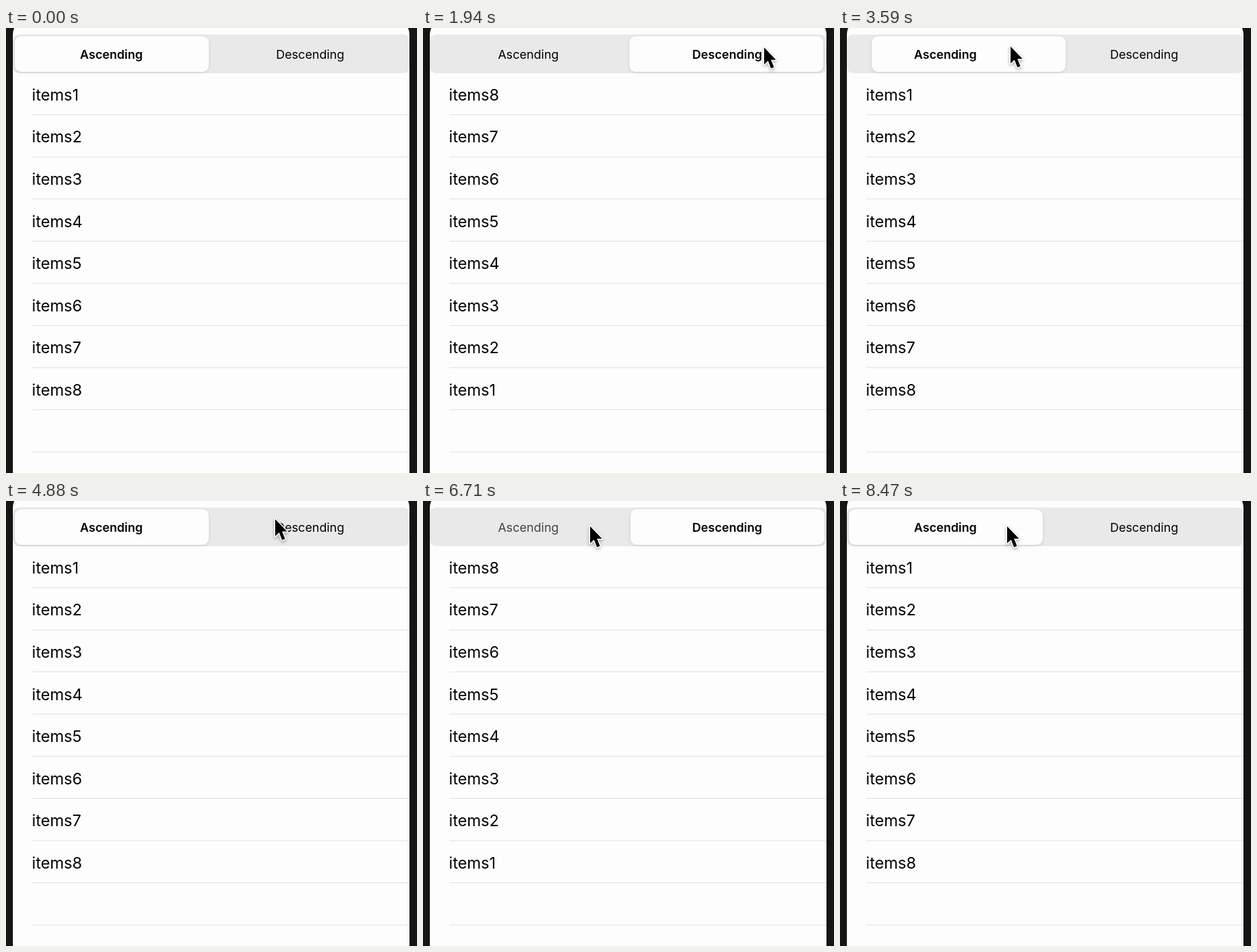
An HTML page for the animation above (8.59 s loop, 600 by 650 pixels).

```html
<!DOCTYPE html>
<html lang="en">
<head>
<meta charset="utf-8">
<title>Sortable list</title>
<style>
  html, body { margin: 0; width: 100%; height: 100%; overflow: hidden; background: #151515; }
  svg { display: block; width: 600px; height: 650px; }
  text { font-family: Inter, "Liberation Sans", sans-serif; fill: #000; }
  .seg { font-size: 17.7px; text-anchor: middle; }
  .bold { font-weight: 600; }
  .row { font-size: 23.2px; }
  #thumb { filter: drop-shadow(0 1px 2px rgba(0, 0, 0, .12)); }
  #cursor { filter: drop-shadow(0 2px 2px rgba(0, 0, 0, .3)); }
</style>
</head>
<body>
<svg viewBox="0 0 600 650">
  <rect width="600" height="650" fill="#151515"/>
  <rect x="10" y="-16" width="579" height="700" rx="26" fill="#fdfdfd"/>
  <rect x="10" y="9.5" width="579" height="56.5" rx="9" fill="#e9e9ea"/>
  <rect id="thumb" y="12" width="283" height="52" rx="9" fill="#fdfdfd"/>
  <g id="labels"></g>
  <g id="list"></g>
  <path id="cursor" d="M0 0V24.8L5.7 19.5L10 30.5L14.4 28.7L10 18H17.3Z"
    fill="#000" stroke="#fff" stroke-width="3" stroke-linejoin="round" paint-order="stroke"/>
</svg>
<script>
const LOOP = 8590, ROWS = 8, PITCH = 61.57;
const THUMB_X = [13, 303];
const FADE = 150;

// Each tap: press time, release time, segment chosen
const taps = [
  [1400, 1470, 1],
  [3270, 3350, 0],
  [4960, 5070, 1],
  [6650, 6775, 0]
];

// Each move: start, end, from, to
const moves = [
  [680, 1240, [548, 665], [498, 28.5]],
  [2240, 3120, [498, 28.5], [249, 27]],
  [3850, 4640, [249, 27], [393, 26.5]],
  [5760, 6540, [393, 26.5], [244, 37]]
];

const $ = id => document.getElementById(id);
const clamp = v => Math.min(1, Math.max(0, v));
const mix = (a, b, k) => a + (b - a) * k;
const smooth = k => k * k * (3 - 2 * k);
const spring = ms => 1 - (1 + ms * 0.0154) * Math.exp(-ms * 0.0154);

function add(parent, tag, attrs, text = '') {
  const el = document.createElementNS('http://www.w3.org/2000/svg', tag);
  for (const key in attrs) el.setAttribute(key, attrs[key]);
  el.textContent = text;
  return parent.appendChild(el);
}

const labels = [['Ascending', 153.8], ['Descending', 444]].map(([name, x]) =>
  ['seg', 'seg bold'].map(cls => add($('labels'), 'text', { class: cls, x, y: 44.5 }, name)));

const rows = Array.from({ length: ROWS }, (_, i) =>
  add($('list'), 'text', { class: 'row', x: 37.8, y: 105.9 + i * PITCH }));

for (let i = 0; i <= ROWS; i++) {
  add($('list'), 'rect', {
    x: 38.5, y: 126.2 + i * PITCH, width: 550.5, height: 0.9, fill: '#dcdce2'
  });
}

function drawControl(t) {
  let chosen = 0, since = Infinity, pressed = -1, dim = 0;
  for (const [down, up, seg] of taps) {
    if (t >= up) {
      chosen = seg;
      since = t - up;
    } else if (t >= down) {
      pressed = seg;
      dim = clamp((t - down) / 170) * 0.8;
    }
  }
  const k = since === Infinity ? 1 : spring(since);
  $('thumb').setAttribute('x', mix(THUMB_X[1 - chosen], THUMB_X[chosen], k));

  const fade = clamp(since / FADE);
  labels.forEach(([plain, bold], i) => {
    const weight = i === chosen ? fade : 1 - fade;
    plain.setAttribute('opacity', (1 - weight) * (i === pressed ? 1 - dim : 1));
    bold.setAttribute('opacity', weight);
  });
  rows.forEach((row, i) => {
    row.textContent = 'items' + (chosen ? ROWS - i : i + 1);
  });
}

function drawCursor(t) {
  let pos = moves[0][2];
  for (const [start, end, from, to] of moves) {
    if (t < start) break;
    const k = smooth(clamp((t - start) / (end - start)));
    pos = [mix(from[0], to[0], k), mix(from[1], to[1], k)];
  }
  $('cursor').setAttribute('transform', `translate(${pos})`);
}

const begin = performance.now();
function draw() {
  const t = (performance.now() - begin) % LOOP;
  drawControl(t);
  drawCursor(t);
  requestAnimationFrame(draw);
}
draw();
</script>
</body>
</html>
```
